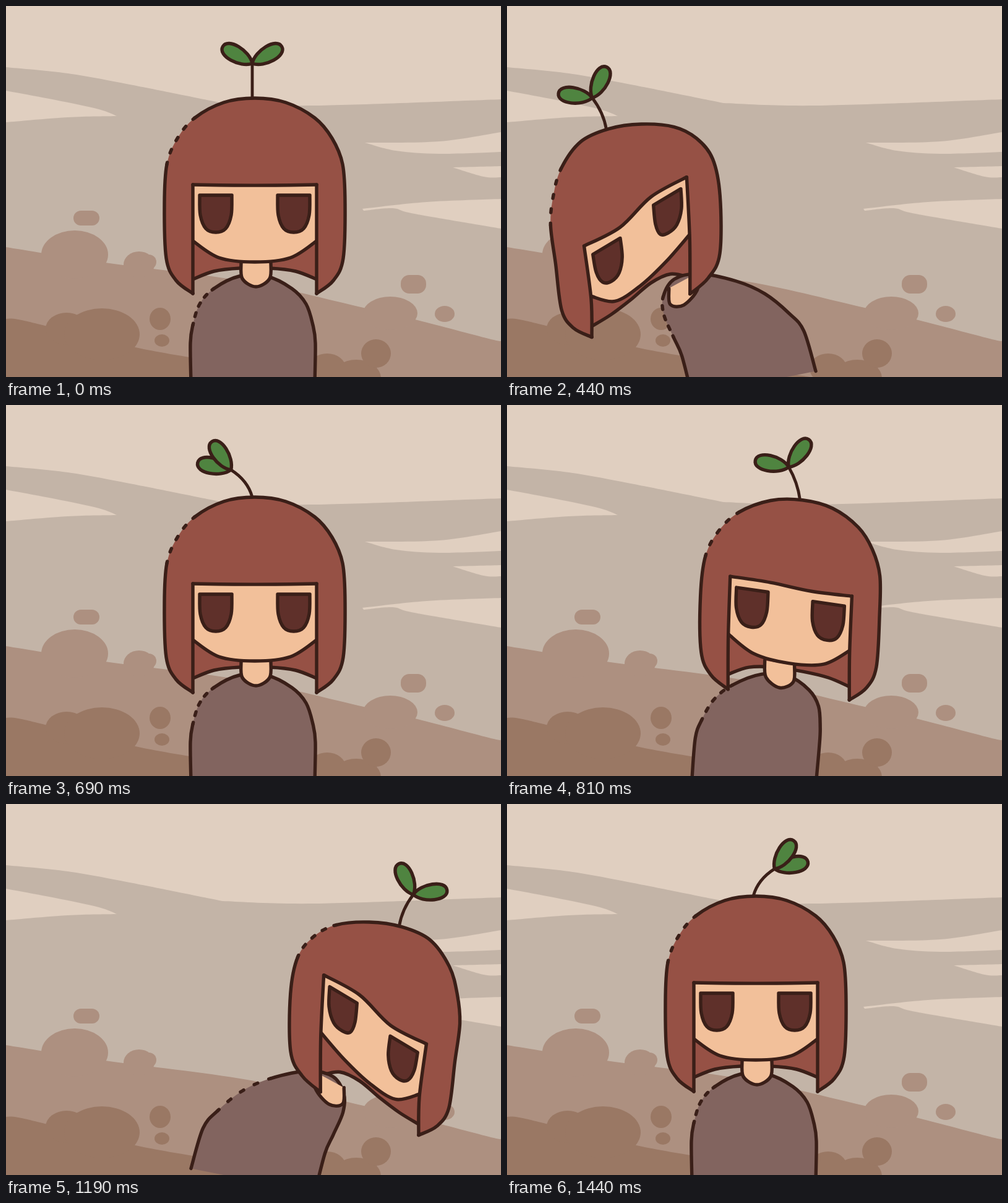
These frames come from a looping animation (800x600 px, 1.5 s). An HTML page with a canvas:

```html
<!DOCTYPE html>
<html lang="en">
<head>
<meta charset="utf-8">
<title>Swaying sprout girl</title>
<style>
html, body { margin: 0; width: 100%; height: 100%; overflow: hidden; background: #e0cfc0; }
canvas { display: block; width: 800px; height: 600px; }
</style>
</head>
<body>
<canvas id="stage" width="800" height="600"></canvas>
<script>
const ctx = document.getElementById('stage').getContext('2d');
const SKY = '#e0cfc0', HAZE = '#c3b4a7', SOIL = '#ad9080', EARTH = '#9a7864';
const INK = '#3a1f18', HAIR = '#965145', SKIN = '#f2c09a', EYE = '#5f302a';
const CLOTH = '#82645f', LEAF = '#4f8440';
const { sin, cos, PI } = Math;
const clamp = (v, lo = 0, hi = 1) => Math.min(hi, Math.max(lo, v));

// Symmetric outline, left to right, from [distance to axis, y] pairs.
function mirror(axis, half) {
  const left = half.map(([d, y]) => [axis - d, y]);
  const right = half.filter(([d]) => d > 0).map(([d, y]) => [axis + d, y]);
  return [...left, ...right.reverse()];
}

// The upright figure.
const hair = mirror(402, [[100, 465], [127, 444], [143, 408], [146, 320], [142, 256],
  [125, 214], [97, 181], [50, 156], [0, 149]]);
const fringe = mirror(402, [[100, 289], [34, 290]]).reverse();
const strandL = [[302, 289], [302, 385], [302, 465]];
const strandR = [[502, 465], [502, 385], [502, 289]];
const chin = mirror(402, [[100, 380], [58, 407], [0, 414]]);
const nape = mirror(402, [[100, 442], [66, 429], [24, 424]]);
const neck = mirror(404, [[24, 414], [22, 441], [0, 454]]);
const body = mirror(399, [[100, 610], [101, 545], [97, 516], [86, 482], [63, 457], [22, 437]]);
const eyes = [339, 465].map(x => mirror(x, [[26, 306], [25, 338], [16, 360], [0, 366]]));
const root = [[398, 149]];

// Lean of each part: s is its amount, lag grows from the way out to the way back.
function leanAt(step) {
  const u = step % 12, side = step < 12 ? 1 : -1;
  const s = sin(PI * u / 11), lag = clamp((u - 3) / 4);
  const bend = rule => points => points.map(([x, y]) => {
    const [dx, dy] = rule((x - 402) * side, y);
    return [x + side * dx, y + dy];
  });
  const head = bend((x, y) => {
    const t = (465 - y) / 316, t3 = t ** 3, v = x / 146;
    const shift = 189 + 15 * lag + (79 - 22 * lag) * t3;
    const squeeze = 25 * sin(2.36 * v) * (1 - t3);
    const tilt = 32 + 8 * lag + 70 * t - (68 + 20 * lag) * t3;
    return [-s * shift - s * s * squeeze, s * s * (43 + 17 * t) - s * tilt * sin(1.88 * v)];
  });
  const throat = bend(x => [-130 * s, 37 * s * s - 0.6 * s * x]);
  const torso = bend((x, y) => {
    const w = clamp((600 - y) / 165, 0, 1.1);
    return [s * (8 * w * (1 - x / 100) - 130 * w ** 1.6), -0.22 * s * x];
  });
  const drag = clamp(58 * cos(PI * u / 11), -38, 38) * clamp(u / 2) * side;
  return { head, throat, torso, drag };
}

// Smooth curve through points a to b of a list.
function curve(p, join, a = 0, b = p.length - 1) {
  const at = i => p[clamp(i, 0, p.length - 1)];
  ctx[join ? 'lineTo' : 'moveTo'](...at(a));
  for (let i = a; i < b; i++) {
    const handle = (j, sign) => at(j).map((v, c) => v + sign * (at(j + 1)[c] - at(j - 1)[c]) / 6);
    ctx.bezierCurveTo(...handle(i, 1), ...handle(i + 1, -1), ...at(i + 1));
  }
}

function fill(color, ...curves) {
  ctx.beginPath();
  curves.forEach((p, i) => curve(p, i > 0));
  ctx.closePath();
  ctx.fillStyle = color;
  ctx.fill();
}

function line(p, a, b) {
  ctx.beginPath();
  curve(p, false, a, b);
  ctx.stroke();
}

// Outline whose stretch between points a and b is dashed.
function brokenLine(p, a, b) {
  let len = 0;
  for (let i = a; i < b; i++) len += Math.hypot(p[i + 1][0] - p[i][0], p[i + 1][1] - p[i][1]);
  line(p, 0, a);
  line(p, b);
  ctx.setLineDash([6, len / 4 - 6]);
  ctx.lineDashOffset = 3;
  line(p, a, b);
  ctx.setLineDash([]);
}

function oval(color, x, y, rx, ry) {
  ctx.beginPath();
  ctx.ellipse(x, y, rx, ry, 0, 0, 2 * PI);
  ctx.fillStyle = color;
  ctx.fill();
}

function pill(color, x, y, w, h, r) {
  ctx.beginPath();
  ctx.roundRect(x, y, w, h, r);
  ctx.fillStyle = color;
  ctx.fill();
}

function drawScene() {
  ctx.fillStyle = SKY;
  ctx.fillRect(0, 0, 800, 600);
  fill(HAZE, [[0, 99], [100, 109], [200, 127], [350, 157]], [[350, 157], [500, 161], [800, 151]],
    [[800, 600], [0, 600]]);
  fill(SKY, [[0, 137], [80, 152], [150, 167], [179, 178]], [[179, 178], [100, 180], [0, 188]]);
  fill(SKY, [[580, 221], [700, 219], [800, 204]], [[800, 236], [700, 239], [630, 234], [580, 221]]);
  fill(SKY, [[722, 261], [800, 259]], [[800, 277], [772, 276], [722, 261]]);
  fill(SKY, [[576, 328], [680, 317], [800, 312]], [[800, 360], [660, 336], [625, 327], [578, 331]]);

  fill(SOIL, [[0, 390], [160, 415], [390, 446], [578, 488], [665, 508], [780, 538], [800, 542]],
    [[800, 600], [0, 600]]);
  oval(SOIL, 111, 402, 54, 39);
  oval(SOIL, 215, 418, 25, 21);
  oval(SOIL, 231, 414, 12, 12);
  oval(SOIL, 621, 497, 44, 27);
  oval(SOIL, 709, 498, 16, 13);
  pill(SOIL, 109, 331, 42, 24, 12);
  pill(SOIL, 638, 435, 41, 30, 14);

  fill(EARTH, [[0, 506], [20, 507], [80, 521], [209, 552], [314, 571], [490, 600]], [[0, 600]]);
  oval(EARTH, 98, 522, 34, 26);
  oval(EARTH, 155, 531, 61, 42);
  oval(EARTH, 249, 506, 17, 18);
  oval(EARTH, 252, 541, 12, 10);
  oval(EARTH, 519, 586, 30, 24);
  oval(EARTH, 566, 602, 40, 30);
  oval(EARTH, 598, 562, 24, 23);
}

function drawGirl({ head, throat, torso }) {
  ctx.strokeStyle = INK;
  ctx.lineWidth = 5.4;
  ctx.lineCap = ctx.lineJoin = 'round';
  const bangs = head(fringe);

  fill(HAIR, head(nape), bangs);
  line(head(nape));
  fill(CLOTH, torso(body));
  brokenLine(torso(body), 2, 4);
  fill(SKIN, throat(neck));
  line(throat(neck));
  fill(SKIN, head(chin), bangs);
  line(head(chin));
  for (const eye of eyes.map(head)) {
    fill(EYE, eye);
    ctx.stroke();
  }

  const locks = [head(strandR), bangs, head(strandL)];
  fill(HAIR, head(hair), ...locks);
  brokenLine(head(hair), 4, 6);
  locks.forEach(p => line(p));
}

function drawLeaf(x, y, angle) {
  const len = 55, w = 16;
  ctx.save();
  ctx.translate(x, y);
  ctx.rotate((angle - 90) * PI / 180);
  ctx.beginPath();
  ctx.moveTo(0, 0);
  ctx.bezierCurveTo(len * 0.25, -w, len, -w * 1.1, len, 0);
  ctx.bezierCurveTo(len, w * 1.1, len * 0.25, w, 0, 0);
  ctx.fillStyle = LEAF;
  ctx.fill();
  ctx.stroke();
  ctx.restore();
}

// The sprout trails behind the head; a strong drag folds its leaves.
function drawSprout({ head, drag }) {
  const [[x, y]] = head(root);
  const out = (angle, len) => [x + len * sin(angle * PI / 180), y - len * cos(angle * PI / 180)];
  const joint = out(drag, 56), q = drag / 38;
  ctx.lineWidth = 4.8;
  ctx.beginPath();
  ctx.moveTo(x, y);
  ctx.quadraticCurveTo(...out(drag * 0.4, 28), ...joint);
  ctx.stroke();
  ctx.lineWidth = 5.4;
  const mid = drag + 18 * q ** 3, spread = 60 - 38 * q ** 4;
  [mid - spread, mid + spread]
    .sort((a, b) => Math.abs(b) - Math.abs(a))
    .forEach(angle => drawLeaf(...joint, angle));
}

// 24 steps per loop, each starting on a 10 ms mark.
function stepAt(ms) {
  let step = 23;
  while (10 * Math.round(6.25 * step) > ms) step--;
  return step;
}

let shown = -1;
const start = performance.now();
function tick() {
  const step = stepAt((performance.now() - start) % 1500);
  if (step !== shown) {
    shown = step;
    const lean = leanAt(step);
    drawScene();
    drawGirl(lean);
    drawSprout(lean);
  }
  requestAnimationFrame(tick);
}
tick();
</script>
</body>
</html>
```
